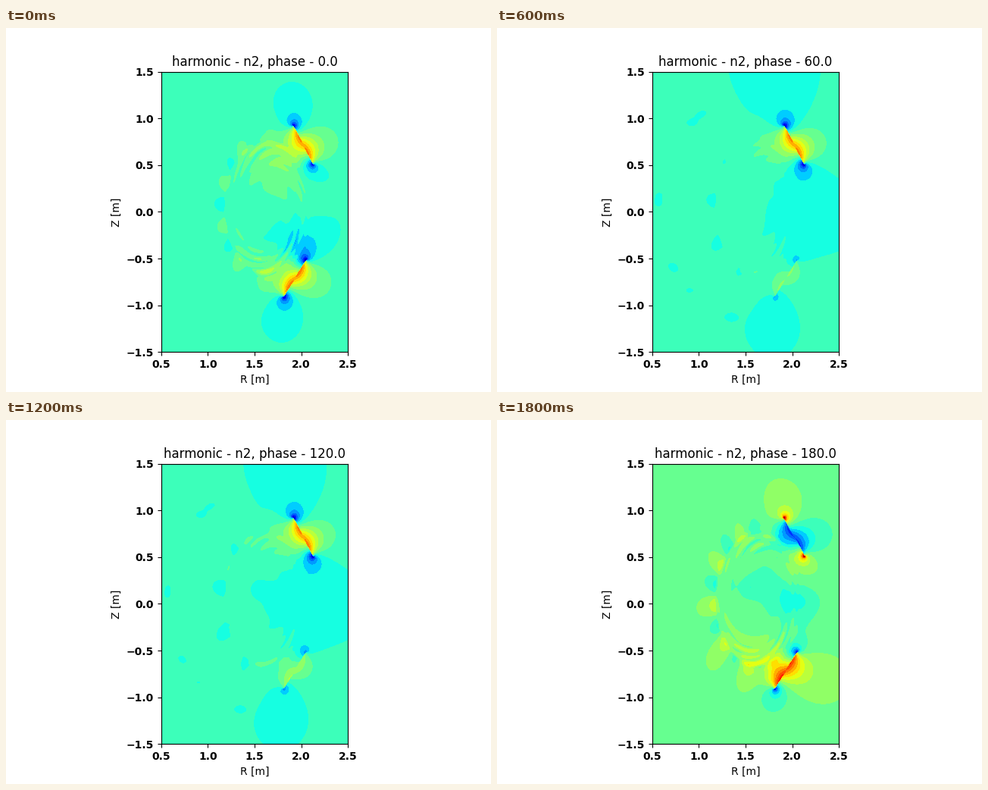
A matplotlib script for the animation above (2 s loop, 640 by 480 pixels).

```python
import numpy as np
import matplotlib.pyplot as plt
from matplotlib.animation import FuncAnimation

plt.rcParams["font.weight"] = "bold"

STEP = 20
FRAMES = 10
LEVELS = np.arange(21)
COIL_GAIN = 7.3      # colour bands between the background and a coil's centre
LOWER_RATIO = 0.28   # lower coil strength against the upper coil's peak
HALF = 29            # half length of a coil

# The field is worked out in stage pixels and drawn in metres.
X, Y = np.meshgrid(np.linspace(204.8, 451.2, 330), np.linspace(57.6, 427.2, 494))
R = 0.5 + (X - 204.8) / 123.2
Z = 1.5 - (Y - 57.6) / 123.2


def blob(cx, cy, sx, sy):
    return np.exp(-0.5 * (((X - cx) / sx) ** 2 + ((Y - cy) / sy) ** 2))


def coil(cx, cy, tilt):
    """Radial field of a current sheet whose current grows from its centre."""
    turn = np.exp(1j * np.radians(tilt))
    w = (X - cx + 1j * (Y - cy)) / turn
    sheet = 1 - w / (2 * HALF) * np.log((w + HALF) / (w - HALF))
    return (1j / turn * sheet).real


upper = coil(392.3, 154.2, 62)
lower = coil(381.2, 330.2, 122.5)

# Plasma coordinates: rho is 1 on the edge, the angle starts on the left.
px, py = (X - 345) / 58, (Y - 237) / 88
rho = np.hypot(px, py)
angle = np.arctan2(py, -px)
left_side = (0.5 + 0.5 * np.cos(angle)) ** 0.8
top_bottom = np.sin(angle) ** 2
edge = np.where(rho > 1, np.exp(-5 * (rho - 1)), np.exp(-25 * (1 - rho)))

rng = np.random.default_rng(4)
texture = np.zeros_like(X)
for _ in range(14):
    m, k = rng.integers(3, 14), rng.uniform(25, 60)
    texture += 0.36 * np.cos(m * angle + k * rho + rng.uniform(0, 2 * np.pi))
texture = (texture + 0.6) * (0.1 + 0.9 * top_bottom) * np.exp(-((rho - 0.86) / 0.14) ** 2)
texture += 0.3 * np.cos(2 * angle + 15 * rho) * np.exp(-((rho - 0.6) / 0.22) ** 2)
texture += 0.8 * top_bottom * np.exp(-((rho - 0.97) / 0.04) ** 2)

dip = -(2.4 * blob(390, 238, 22, 17) + 1.5 * blob(334, 221, 14, 10)
        + 0.4 * blob(360, 225, 40, 30) + 0.2 * blob(440, 232, 40, 30))
lift = (1.3 * blob(365, 195, 28, 26) + 0.8 * blob(400, 222, 25, 18)
        - 1.2 * blob(380, 281, 25, 16))

# Faint specks on a wide arc, seen only when the background nears a level.
specks = np.zeros_like(X)
for a in rng.uniform(-1.5, 1.5, 12):
    specks -= 0.15 * blob(345 - 132 * np.cos(a), 237 + 150 * np.sin(a), 6, 4)


def field(phase):
    up = np.cos(np.radians(phase - 75))
    norm = max(abs(up), LOWER_RATIO)
    up, low = up / norm, LOWER_RATIO / norm
    s = phase / 180

    zero = 8.05 + 0.25 * low ** 2 + 1.5 * max(-up, 0)
    coils = COIL_GAIN * (up * upper + low * lower)
    ripple = -np.cos(10 * (angle + 0.05 + 0.18 * s)) * left_side * edge
    core = np.cos(np.radians(phase - 160)) ** 3
    plasma = (1.3 + s) * ripple + 0.9 * texture + abs(core) * (dip if core > 0 else lift)
    return np.clip(zero + coils + low * plasma + specks, 0.01, 19.99)


fig, ax = plt.subplots(figsize=(6.4, 4.8), dpi=100)


def draw(i):
    phase = float(i * STEP)
    ax.clear()
    ax.contourf(R, Z, field(phase), levels=LEVELS, cmap="jet")
    ax.set_aspect("equal")
    ax.set(xlim=(0.5, 2.5), ylim=(-1.5, 1.5), xlabel="R [m]", ylabel="Z [m]")
    ax.set_title(f"harmonic - n2, phase - {phase}", pad=5.3)
    ax.set_xticks(np.arange(0.5, 2.6, 0.5))
    ax.set_yticks(np.arange(-1.5, 1.6, 0.5))
    return ax.get_children()


anim = FuncAnimation(fig, draw, frames=FRAMES, interval=200, repeat=True,
                     repeat_delay=0)
plt.show()
```
